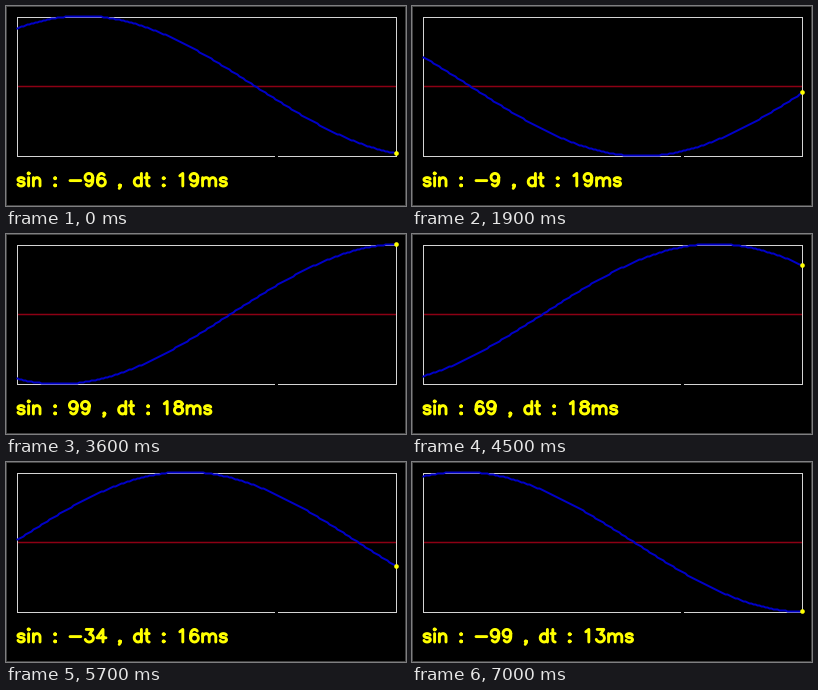
Write a matplotlib script that moves like this. It is 400 px wide and 200 px high and loops after 7100 ms.

```python
import numpy as np
import matplotlib.pyplot as plt
from matplotlib.animation import FuncAnimation
from matplotlib.collections import LineCollection
from matplotlib.patches import Circle

FRAMES, STEP = 71, 100
W, H, DPI = 400, 200, 100
LEFT, RIGHT, TOP, BOTTOM = 11, 390, 11, 150
MID, AMP = 80, 70
RAD_PER_PX = 0.00915
SCALE, TEXT_X, BASELINE = 0.6, 10, 180
YELLOW = "#ffff00"


def px(n):
    return n * 72 / DPI


def arc(cx, cy, rx, ry, start=0, end=360, n=17):
    a = np.radians(np.linspace(start, end, n))
    return list(zip(cx + rx * np.cos(a), cy + ry * np.sin(a)))


def dot(x, y):
    return arc(x, y, 1, 1, n=5)


def hump(x):
    return [(x, 10)] + arc(x + 6, 8.5, 5, 5.5, 135, 0, 9) + [(x + 11, 0)]


def make_glyphs():
    """Stroke font: character -> (advance, strokes), y up from the baseline."""
    stem = [(4, 14), (4, 0)]
    six = arc(10.5, 11.5, 6.5, 9.5, 45, 180, 9) + arc(10.5, 6.5, 6.5, 6.5, 180, 540)
    nine = [(20 - x, 21 - y) for x, y in six]
    ess = arc(8.5, 10.7, 5.3, 3.3, 15, 270) + arc(8.5, 3.7, 5.4, 3.7, 90, -165)
    return {
        " ": (16, []),
        "-": (26, [[(4, 9), (22, 9)]]),
        ":": (10, [dot(5, 13), dot(5, 1)]),
        ",": (10, [dot(5, 1), [(6, 1), (6, -1), (4, -4)]]),
        "0": (20, [arc(10, 10.5, 7, 10.5)]),
        "1": (20, [[(6, 17), (11, 21), (11, 0)]]),
        "2": (20, [arc(10, 15.5, 6, 5.5, 175, -30) + [(3, 0), (17, 0)]]),
        "3": (20, [[(5, 21), (16, 21)] + arc(10, 6.5, 7, 6.5, 85, -160)]),
        "4": (20, [[(13, 0), (13, 21), (3, 7), (18, 7)]]),
        "5": (20, [[(15, 21), (5, 21)] + arc(10, 7, 7, 7, 135, -155)]),
        "6": (20, [six]),
        "7": (20, [[(3, 21), (17, 21), (7, 0)]]),
        "8": (20, [arc(10, 16.8, 6, 4.2), arc(10, 6.3, 7, 6.3)]),
        "9": (20, [nine]),
        "s": (17, [ess]),
        "i": (8, [dot(4, 21), stem]),
        "n": (19, [stem, hump(4)]),
        "m": (30, [stem, hump(4), hump(15)]),
        "d": (19, [[(15, 21), (15, 0)], arc(9.5, 7, 6.5, 7, 32, 328)]),
        "t": (12, [[(5, 21)] + arc(9, 4, 4, 4, 180, 270, 5), [(2, 14), (9, 14)]]),
    }


GLYPHS = make_glyphs()


def text_strokes(text):
    strokes, pen = [], 0
    for ch in text:
        advance, shapes = GLYPHS[ch]
        for shape in shapes:
            strokes.append([(TEXT_X + (pen + x) * SCALE, BASELINE - y * SCALE)
                            for x, y in shape])
        pen += advance
    return strokes


def phase_at(i):
    """Phase at the right edge: steady, with a slight slow drift."""
    return 4.4382 + 0.0933 * i - 0.026 * np.sin(2 * np.pi * i / (FRAMES - 1))


def step_at(i):
    u = i / (FRAMES - 1)
    return int(19.8 + 3 * u - 9 * u * u)


def height(phase):
    return np.floor(MID - AMP * np.sin(phase)) + 0.5


fig = plt.figure(figsize=(W / DPI, H / DPI), dpi=DPI, facecolor="black")
ax = fig.add_axes([0, 0, 1, 1])
ax.set_xlim(0, W)
ax.set_ylim(H, 0)
ax.axis("off")


def box(x0, y0, x1, y1, color):
    ax.plot([x0, x1, x1, x0, x0], [y0, y0, y1, y1, y0], color=color,
            lw=px(1), aa=False, solid_joinstyle="miter")


box(0, 0, W - 1, H - 1, "#404040")
box(LEFT, TOP, RIGHT, BOTTOM, "#d4d4d4")
ax.plot([LEFT + 1, RIGHT], [MID + 0.5] * 2, color="#8c0014", lw=px(1.5),
        snap=False, solid_capstyle="butt")
ax.plot([269, 271], [BOTTOM, BOTTOM], color="black", lw=px(1), aa=False,
        solid_capstyle="butt", zorder=4)

xs = np.append(np.arange(LEFT, RIGHT, 2), RIGHT)
wave, = ax.plot([], [], color="#0000c8", lw=px(2), snap=False)
ball = ax.add_patch(Circle((0, 0), 2.3, color=YELLOW, lw=0, zorder=5))
label = LineCollection([], colors=YELLOW, linewidths=px(2.9),
                       capstyle="round", joinstyle="round")
label.set_snap(False)
ax.add_collection(label, autolim=False)


def draw(i):
    phase = phase_at(i)
    wave.set_data(xs + 0.5, height(phase - (RIGHT - xs) * RAD_PER_PX))
    ball.center = RIGHT + 0.5, height(phase)
    value = int(100 * np.sin(phase))
    label.set_segments(text_strokes(f"sin : {value} , dt : {step_at(i)}ms"))
    return wave, ball, label


anim = FuncAnimation(fig, draw, frames=FRAMES, interval=STEP,
                     repeat=True, repeat_delay=0, blit=False)
plt.show()
```
